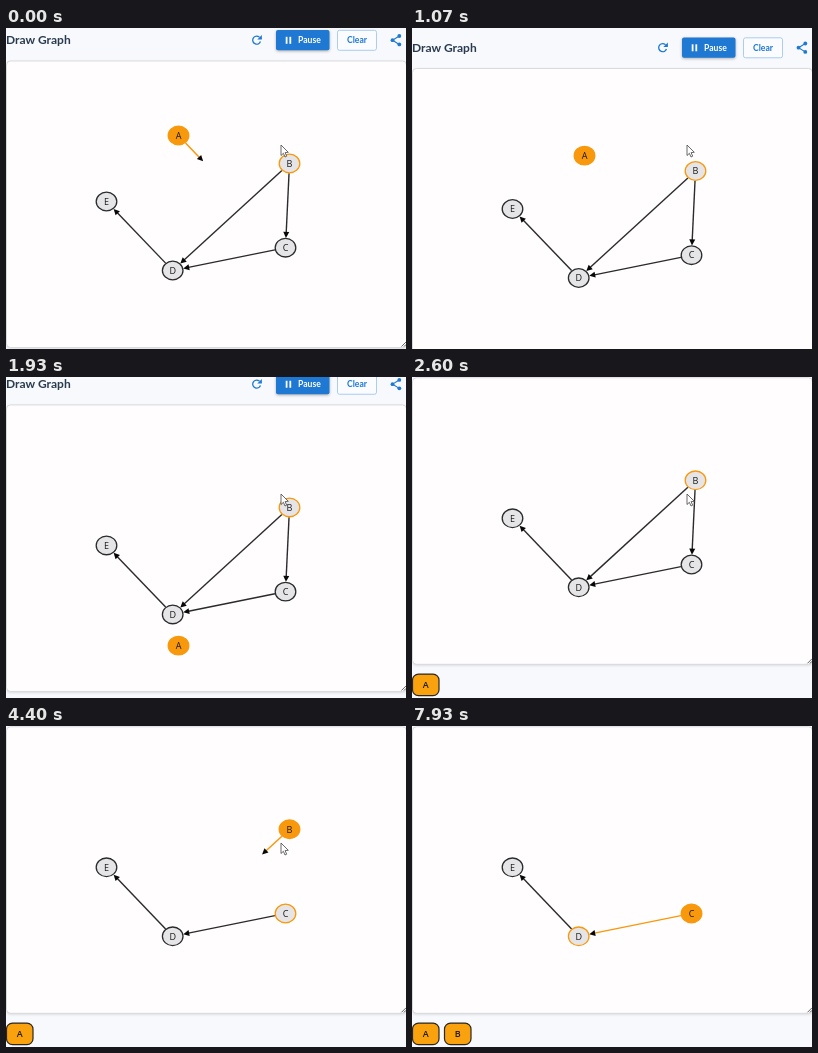
Animation of 400 by 321 pixels, one loop 8000 ms. Source, as an HTML page with a canvas:

```html
<!DOCTYPE html>
<html>
<head>
<meta charset="utf-8">
<style>
  html, body { margin: 0; width: 100%; height: 100%; overflow: hidden; background: #f7f9fd; }
  canvas { display: block; width: 400px; height: 321px; }
</style>
</head>
<body>
<canvas id="stage"></canvas>
<script>
const W = 400, H = 321, LOOP = 8000;
const ORANGE = '#f8980c', DARK = '#2b2b2d', BLUE = '#1f78d1';
const SHRINK_SPEED = 0.18, FALL_SPEED = 0.1785;   // px per ms
const PANEL = { x: 0.5, y: 33, w: 400, h: 286.5 };

// Times in ms: ready = orange outline, active = orange fill, fall = start of the drop
const nodes = {
  A: { x: 172.5, y: 107.5, ready: -1, active: -1, fall: 1000 },
  B: { x: 283.5, y: 135.5, ready: -1, active: 3540, fall: 5320 },
  C: { x: 279.5, y: 219.7, ready: 3760, active: 7690, fall: Infinity },
  D: { x: 166.7, y: 242.5, ready: 7925, active: Infinity, fall: Infinity },
  E: { x: 100.5, y: 173.5, ready: Infinity, active: Infinity, fall: Infinity }
};
// paint = start of the orange sweep, shrink = start of the retreat
const edges = [
  { from: 'A', to: 'C', paint: -1000, shrink: -605 },
  { from: 'B', to: 'C', paint: 3560, shrink: 3785 },
  { from: 'B', to: 'D', paint: 3560, shrink: 3785 },
  { from: 'C', to: 'D', paint: 7730, shrink: Infinity },
  { from: 'D', to: 'E', paint: Infinity, shrink: Infinity }
];
const chips = [{ name: 'A', x: 0.5, at: 2350 }, { name: 'B', x: 32.5, at: 6480 }];
const scrollKeys = [[0, 0], [700, 7.5], [1350, 7.5], [1930, -5], [2500, -32.2]];

const canvas = document.getElementById('stage');
const ctx = canvas.getContext('2d');
const scale = window.devicePixelRatio || 1;
canvas.width = W * scale;
canvas.height = H * scale;

const clamp01 = v => Math.max(0, Math.min(1, v));

function track(keys, t) {
  for (let i = 1; i < keys.length; i++) {
    const [t0, v0] = keys[i - 1], [t1, v1] = keys[i];
    if (t < t1) return v0 + (v1 - v0) * clamp01((t - t0) / (t1 - t0));
  }
  return keys[keys.length - 1][1];
}

function box(x, y, w, h, r, fill, stroke, width = 1) {
  ctx.beginPath();
  ctx.roundRect(x, y, w, h, r);
  if (fill) { ctx.fillStyle = fill; ctx.fill(); }
  if (stroke) { ctx.strokeStyle = stroke; ctx.lineWidth = width; ctx.stroke(); }
}

function line(points, color, width) {
  ctx.beginPath();
  points.forEach(([x, y]) => ctx.lineTo(x, y));
  ctx.strokeStyle = color;
  ctx.lineWidth = width;
  ctx.stroke();
}

function polygon(points, fill, stroke) {
  ctx.beginPath();
  points.forEach(([x, y]) => ctx.lineTo(x, y));
  ctx.closePath();
  ctx.fillStyle = fill;
  ctx.fill();
  if (stroke) { ctx.strokeStyle = stroke; ctx.lineWidth = 0.8; ctx.stroke(); }
}

function dot(x, y, r, color) {
  ctx.beginPath();
  ctx.arc(x, y, r, 0, 7);
  ctx.fillStyle = color;
  ctx.fill();
}

function label(text, x, y, font, color, align = 'center') {
  ctx.font = font;
  ctx.fillStyle = color;
  ctx.textAlign = align;
  ctx.fillText(text, x, y);
}

function drawHeader() {
  label('Draw Graph', 0, 16.2, 'bold 12px Lato, sans-serif', '#2a3b50', 'left');

  ctx.beginPath();
  ctx.arc(250.7, 12.2, 4, 0.35, 5.5);
  ctx.strokeStyle = BLUE;
  ctx.lineWidth = 1.3;
  ctx.stroke();
  polygon([[255.9, 7], [255.9, 11.6], [251.3, 11.6]], BLUE);

  ctx.save();
  ctx.shadowColor = 'rgba(0,0,0,.3)';
  ctx.shadowBlur = 3 * scale;
  ctx.shadowOffsetY = scale;
  box(270, 2, 53.5, 20.3, 2, BLUE);
  ctx.restore();
  box(279.7, 8.8, 1.8, 7, 0, '#fff');
  box(283.4, 8.8, 1.8, 7, 0, '#fff');
  label('Pause', 292, 15.2, 'bold 8.6px Lato, sans-serif', '#fff', 'left');

  box(331.5, 2.3, 39, 20, 2, '#fafcff', '#a3c8ee', 0.9);
  label('Clear', 351, 15.2, 'bold 8.6px Lato, sans-serif', BLUE);

  line([[393.3, 8], [386.5, 12.2], [393.3, 16.4]], BLUE, 1.1);
  [[393.3, 8], [386.5, 12.2], [393.3, 16.4]].forEach(([x, y]) => dot(x, y, 1.9, BLUE));
}

function drawPanel() {
  ctx.save();
  ctx.shadowColor = 'rgba(0,0,0,.16)';
  ctx.shadowBlur = 3 * scale;
  ctx.shadowOffsetY = scale;
  box(PANEL.x, PANEL.y, PANEL.w, PANEL.h, 4, '#fffdfe');
  ctx.restore();
  box(PANEL.x, PANEL.y, PANEL.w, PANEL.h, 4, null, '#d9dade', 1);
  line([[395.5, 318.5], [400, 314]], '#555', 0.9);
  line([[398, 318.5], [400, 316.5]], '#555', 0.9);
}

function drawEdge(edge, t) {
  const a = nodes[edge.from], b = nodes[edge.to];
  const dx = b.x - a.x, dy = b.y - a.y, length = Math.hypot(dx, dy);
  const ux = dx / length, uy = dy / length;
  const rim = 1 / Math.hypot(ux / 10.8, uy / 9.8);
  const tip = length - rim - Math.max(0, t - edge.shrink) * SHRINK_SPEED;
  if (tip < rim) return;

  const at = (d, side = 0) => [a.x + ux * d - uy * side, a.y + uy * d + ux * side];
  const end = Math.max(rim, tip - 4);
  const painted = rim + (end - rim) * clamp01((t - edge.paint) / 195);
  if (painted < end) line([at(painted), at(end)], DARK, 1.4);
  if (painted > rim) line([at(rim), at(painted)], ORANGE, 1.5);
  polygon([at(tip), at(tip - 6, 3), at(tip - 6, -3)], '#080808');
}

function drawNode(name, t) {
  const n = nodes[name];
  const y = n.y + Math.max(0, t - n.fall) * FALL_SPEED;
  if (y > PANEL.y + PANEL.h + 12) return;
  ctx.beginPath();
  ctx.ellipse(n.x, y, 10.3, 9.3, 0, 0, 7);
  ctx.fillStyle = t >= n.active ? ORANGE : '#e5e5e7';
  ctx.fill();
  ctx.strokeStyle = t >= n.ready ? ORANGE : DARK;
  ctx.lineWidth = 1.3;
  ctx.stroke();
  label(name, n.x, y + 3.2, '9px "Open Sans", sans-serif', '#151515');
}

function drawGraph(t) {
  ctx.save();
  ctx.beginPath();
  ctx.rect(PANEL.x, PANEL.y, PANEL.w, PANEL.h);
  ctx.clip();
  edges.forEach(edge => drawEdge(edge, t));
  ['E', 'D', 'C', 'B', 'A'].forEach(name => drawNode(name, t));
  ctx.restore();
}

function drawChips(t) {
  for (const { name, x, at } of chips) {
    if (t < at) continue;
    box(x, 329.3, 26.5, 21.6, 6, '#faa10e', '#292724', 1.2);
    label(name, x + 13.3, 343.3, '600 9px "Open Sans", sans-serif', '#1c1a16');
  }
}

function drawCursor(t) {
  if (t > 7560) return;
  const p = clamp01((t - 7250) / 300);
  const x = 275 + 52 * p, y = 117 - 18 * p;
  const outline = [[0, 0], [0, 10.5], [2.4, 8.3], [4, 12], [5.7, 11.2], [4.1, 7.6], [7.3, 7.3]];
  polygon(outline.map(([px, py]) => [x + px, y + py]), '#fff', '#444');
}

function frame(now) {
  const t = now % LOOP;
  ctx.setTransform(scale, 0, 0, scale, 0, 0);
  ctx.fillStyle = '#f7f9fd';
  ctx.fillRect(0, 0, W, H);
  ctx.save();
  ctx.translate(0, track(scrollKeys, t));
  drawHeader();
  drawPanel();
  drawGraph(t);
  drawChips(t);
  ctx.restore();
  drawCursor(t);
  requestAnimationFrame(frame);
}

const start = performance.now();
requestAnimationFrame(() => frame(0));
frame = (draw => () => draw((performance.now() - start)))(frame);
</script>
</body>
</html>
```
